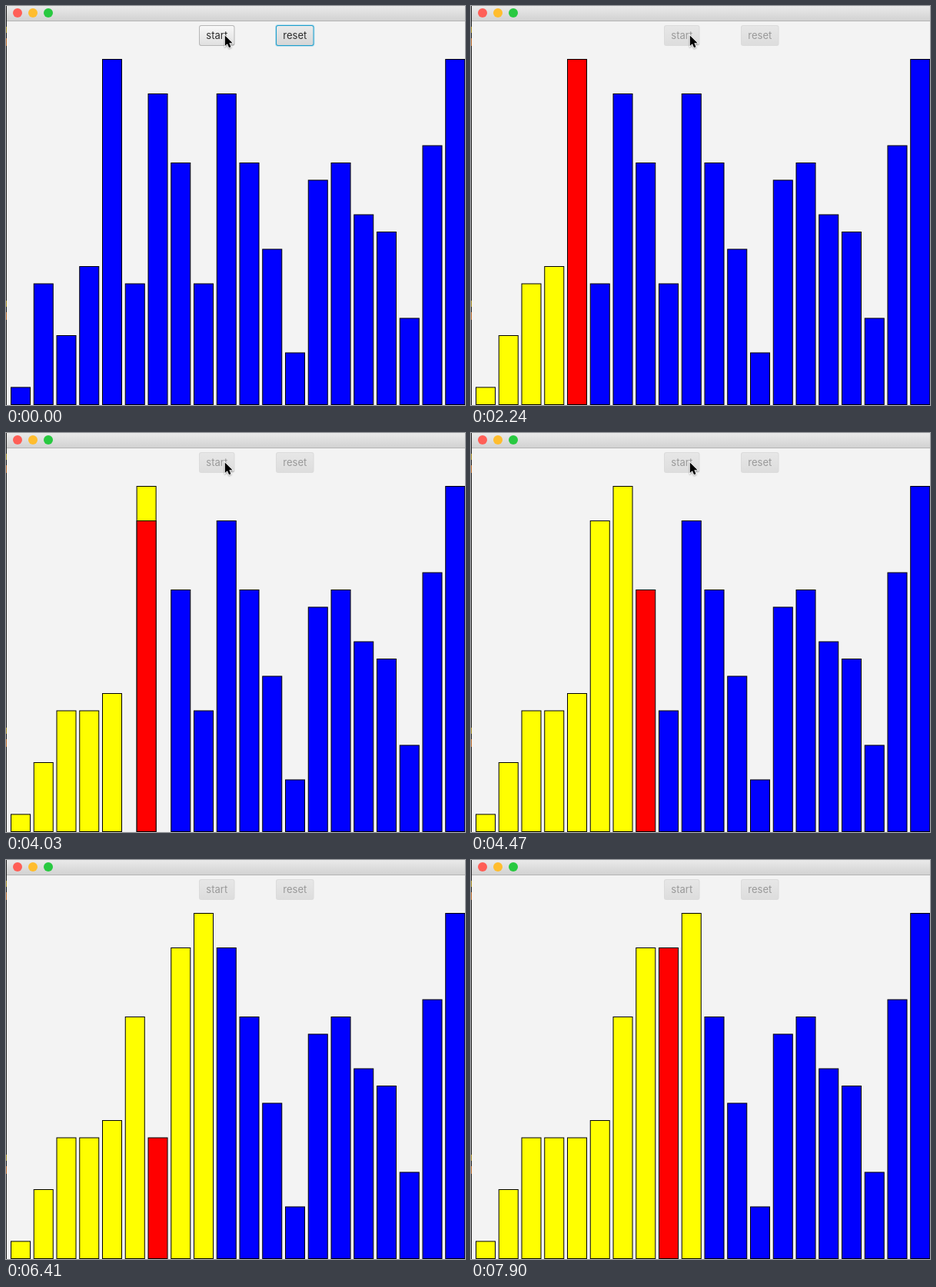
An HTML page with a canvas that plays this animation: 597x520 px, repeating every 8 s.

```html
<!DOCTYPE html>
<html lang="en">
<head>
<meta charset="utf-8">
<title>Insertion sort</title>
<style>
  html, body { margin: 0; width: 100%; height: 100%; overflow: hidden; background: #f3f3f3; }
  canvas { display: block; }
</style>
</head>
<body>
<canvas id="stage" width="597" height="520"></canvas>
<script>
const ctx = document.getElementById('stage').getContext('2d');
const LOOP = 8000;
const START_PRESSED = 900;
const VALUES = [1, 7, 4, 8, 20, 7, 18, 14, 7, 18, 14, 9, 3, 13, 14, 11, 10, 5, 15, 20];

// pick: mark the next unsorted bar; half: two bars cross; swap: the exchange is done
const STEPS = [
  [900, 'pick'], [1200, 'pick'], [1650, 'swap'],
  [1950, 'pick'], [2240, 'pick'],
  [2540, 'pick'], [2980, 'swap'], [3280, 'half'], [3430, 'swap'],
  [3730, 'pick'], [4030, 'half'], [4170, 'swap'],
  [4470, 'pick'], [4770, 'half'], [4920, 'swap'], [5220, 'swap'],
  [5520, 'pick'], [5960, 'swap'], [6260, 'half'], [6410, 'swap'],
  [6710, 'half'], [6860, 'swap'], [7160, 'half'], [7310, 'swap'],
  [7600, 'pick'], [7900, 'swap'],
];

function sortState(time) {
  const values = [...VALUES];
  let sorted = 0, active = -1, crossing = false;
  for (const [at, action] of STEPS) {
    if (at > time) break;
    crossing = action === 'half';
    if (action === 'pick') active = ++sorted;
    if (action === 'swap') {
      [values[active - 1], values[active]] = [values[active], values[active - 1]];
      active--;
    }
  }
  return { values, sorted, active, crossing };
}

function verticalGradient(top, bottom, from, to) {
  const gradient = ctx.createLinearGradient(0, top, 0, bottom);
  gradient.addColorStop(0, from);
  gradient.addColorStop(1, to);
  return gradient;
}

function fillRect(x, y, w, h, color) {
  ctx.fillStyle = color;
  ctx.fillRect(x, y, w, h);
}

function roundRect(x, y, w, h, radius, fill) {
  ctx.beginPath();
  ctx.roundRect(x, y, w, h, radius);
  ctx.fillStyle = fill;
  ctx.fill();
}

function drawWindow() {
  fillRect(0, 0, 597, 520, '#f3f3f3');
  fillRect(0, 0, 597, 19, verticalGradient(0, 19, '#eaeaea', '#d2d2d2'));
  fillRect(0, 19, 597, 1, '#b4b4b4');
  ['#ff5f57', '#ffbd2e', '#28c940'].forEach((color, i) => {
    ctx.beginPath();
    ctx.arc(15 + 20 * i, 9, 6, 0, 2 * Math.PI);
    ctx.fillStyle = color;
    ctx.fill();
  });
  fillRect(0, 0, 1, 520, '#1e1e1e');
  for (const y of [27, 384]) {
    fillRect(0, y, 1, 8, '#a08a20');
    fillRect(0, y + 15, 1, 10, '#b8692a');
  }
}

function drawButton(label, x, width, disabled, focused) {
  ctx.save();
  if (disabled) ctx.globalAlpha = 0.4;
  if (focused) {
    roundRect(x - 1, 24, width + 2, 29, 4, '#b9dfee');
    roundRect(x, 25, width, 27, 3, '#1f9fcb');
  } else {
    roundRect(x, 25, width, 27, 3, '#b6b6b6');
  }
  const face = focused ? ['#ebebeb', '#d6d6d6'] : ['#f8f8f8', '#e0e0e0'];
  roundRect(x + 1, 26, width - 2, 25, 2, verticalGradient(26, 51, ...face));
  ctx.fillStyle = '#2c2c2c';
  ctx.font = '13px Inter, sans-serif';
  ctx.textAlign = 'center';
  ctx.fillText(label, x + width / 2, 43);
  ctx.restore();
}

function drawBar(position, value, color) {
  const box = [6.5 + 29.75 * position, 519.5 - 22.5 * value, 25, 22.5 * value];
  fillRect(...box, color);
  ctx.strokeStyle = '#000';
  ctx.lineWidth = 1;
  ctx.strokeRect(...box);
}

function drawBars(time) {
  const { values, sorted, active, crossing } = sortState(time);
  const shift = crossing ? 0.5 : 0;
  values.forEach((value, i) => {
    if (i === active) return;
    const color = active >= 0 && i <= sorted ? '#ff0' : '#00f';
    drawBar(i === active - 1 ? i + shift : i, value, color);
  });
  if (active >= 0) drawBar(active - shift, values[active], '#f00');
}

function drawCursor(x, y) {
  const outline = [[0, 0], [0, 13.6], [3.1, 10.7], [5.3, 15.8], [7.7, 14.8], [5.5, 9.8], [9.8, 9.8]];
  ctx.save();
  ctx.translate(x, y);
  ctx.beginPath();
  outline.forEach(point => ctx.lineTo(...point));
  ctx.closePath();
  ctx.shadowColor = 'rgba(0, 0, 0, 0.35)';
  ctx.shadowBlur = 2;
  ctx.shadowOffsetY = 1;
  ctx.strokeStyle = '#fff';
  ctx.lineWidth = 1.6;
  ctx.stroke();
  ctx.shadowColor = 'transparent';
  ctx.fillStyle = '#000';
  ctx.fill();
  ctx.restore();
}

function draw() {
  const time = performance.now() % LOOP;
  const running = time >= START_PRESSED;
  drawWindow();
  drawButton('start', 251, 46.5, running, false);
  drawButton('reset', 351, 49.5, running, !running);
  drawBars(time);
  if (time < 5370) drawCursor(284.8, 38.5);
  else if (time < 5660) drawCursor(496, 173);
  requestAnimationFrame(draw);
}
draw();
</script>
</body>
</html>
```
